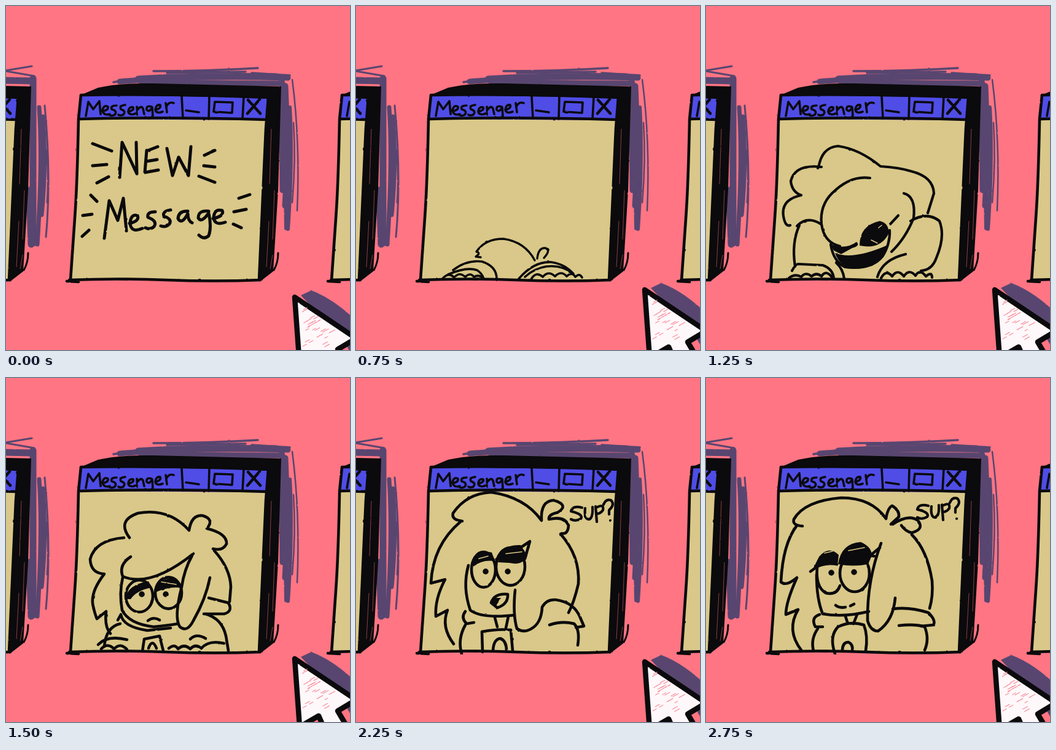
Recreate the animation shown at these times as an HTML page. Size 560 by 560 pixels, loop 3000 ms.

```html
<!DOCTYPE html>
<html lang="en">
<head>
<meta charset="utf-8">
<title>New message</title>
<style>
html, body { margin: 0; width: 100%; height: 100%; overflow: hidden; background: #ff7583; }
svg { display: block; width: 100vw; height: 100vh; }
.ink { fill: none; stroke: #0b0a0c; stroke-width: var(--w, 4.6); stroke-linecap: round; stroke-linejoin: round; }
.black { fill: #0b0a0c; stroke: none; }
.shade { fill: none; stroke: #584670; stroke-linecap: round; }
.dot { stroke-width: 9.5; }
.tan { stroke: #d9c889; stroke-width: 1.6; }
</style>
</head>
<body>
<svg viewBox="0 0 560 560" preserveAspectRatio="xMidYMid slice">
  <defs>
    <filter id="rough" filterUnits="userSpaceOnUse" x="-20" y="-20" width="620" height="660" color-interpolation-filters="sRGB">
      <feTurbulence type="fractalNoise" baseFrequency=".1" numOctaves="2" seed="4" result="noise"/>
      <feDisplacementMap in="SourceGraphic" in2="noise" scale="1.8" xChannelSelector="R" yChannelSelector="G"/>
      <feGaussianBlur stdDeviation=".45"/>
    </filter>
    <clipPath id="pane"><path d="M112 181H424L418 450H104Z"/></clipPath>
    <g id="window">
      <path class="black" d="M119 146L150 133Q185 125 240 126L448 131L443 300L435 432L413 449L420 150Z"/>
      <g fill="none" stroke="#f06b78" stroke-width="1" opacity=".55">
        <path d="M432 200L429 290M437 300L434 380M428 350L424 425M434 405L430 428"/>
      </g>
      <path fill="#d9c889" d="M120 184L424 186L412 446H106Q116 330 116 250Z"/>
      <path fill="#4f4de6" d="M122 145L427 149L424 186L119 184Z"/>
      <g class="ink">
        <path d="M122 145Q270 142 427 149L423 200L412 446M122 145L118 184Q116 290 112 345L105 446M99 448L118 449M104 446Q180 443 260 446T414 446M119 184Q260 180 424 185"/>
        <path stroke-width="3" d="M443 402Q443 418 436 430"/>
        <path stroke-width="3.6" d="M286 147L288 183M331 146L330 184M387 148L385 184M293 170L314 173M340 156L369 157L368 174L338 172Z"/>
        <path d="M394 153L414 175M413 152L393 175"/>
        <g stroke-width="3.6" transform="translate(1 1)" aria-label="Messenger">
          <path d="M129 178L133 155L141 167L151 154L153 175M156 170Q166 169 165 163Q159 159 156 168Q157 178 168 175M179 161Q169 161 171 167Q181 170 176 176Q171 179 167 176"/>
          <path d="M193 160Q183 161 186 167Q195 170 190 176Q185 178 182 176M198 171Q208 169 206 164Q199 162 198 171Q200 178 210 174M212 163L213 176M213 168Q219 160 222 166L224 175"/>
          <path d="M236 163Q227 160 228 168Q232 173 237 164L238 178Q234 184 226 180M242 168Q252 166 250 160Q243 159 242 168Q244 175 254 171M259 157L261 172M260 163Q264 154 272 157"/>
        </g>
      </g>
    </g>
  </defs>
  <rect width="560" height="560" fill="#ff7583"/>
  <g filter="url(#rough)">
    <g class="shade">
      <path stroke-width="9" d="M185 123Q300 113 459 117M215 118Q310 112 440 114M220 125L450 126"/>
      <path stroke-width="3.5" d="M240 106Q330 106 410 101M262 109L390 107M175 124L230 115M400 109L462 113"/>
      <path stroke-width="9" d="M449 120L450 300M455 130Q460 230 454 325"/>
      <path stroke-width="6" d="M462 165Q467 250 459 363M455 300L456 362"/>
      <path stroke-width="2.5" d="M466 120Q479 220 474 333M468 190Q472 250 466 320"/>
      <path stroke-width="11" d="M-5 121L43 122M44 118V386M38 300L41 388"/>
      <path stroke-width="7" d="M54 165Q60 250 51 388M60 180Q66 260 58 340"/>
      <path stroke-width="3" d="M0 105L42 98M0 106L46 114M63 162Q74 280 65 376M66 235Q70 280 67 320"/>
    </g>
    <use href="#window" x="-407"/>
    <use href="#window" x="425"/>
    <use href="#window"/>
  </g>
  <g id="cursor">
    <g filter="url(#rough)">
      <path fill="#584670" d="M480 471L497 463Q535 477 575 517V590L550 545Z"/>
      <path class="ink" style="fill:#fff8fa;--w:8.5" d="M470 474L478 585L509 567L527 608L563 598L540 559L570 541Z"/>
      <g id="scratches" stroke="#f78f9d" stroke-width="1.2" stroke-linecap="round"></g>
    </g>
  </g>
  <g clip-path="url(#pane)"><g id="actor" filter="url(#rough)"></g></g>
</svg>
<script>
const $ = id => document.getElementById(id);

// Each drawing: ink lines, solid black areas, dots and light strokes over the black.
const art = {
  notice: {
    width: 5,
    ink: [
      "M185 279L189 222L213 273L212 222M229 235L226 271L248 267M229 236L247 229M228 253L246 250M262 232L271 276L281 246L297 276L301 229",
      "M160 378L168 317L182 349L191 313L196 366M201 354Q218 350 214 341Q203 338 202 354Q204 370 222 362M243 335Q229 335 231 344Q247 350 241 359Q235 365 227 361",
      "M268 332Q254 334 257 342Q271 347 266 355Q260 361 252 358M296 334Q281 333 280 346Q286 357 296 338Q296 350 303 353",
      "M330 334Q313 332 313 345Q318 354 330 337Q335 360 330 374Q322 381 314 373M337 346Q356 342 352 333Q339 329 338 345Q340 358 357 352",
      "M141 224L172 236M141 260L164 258M148 288L167 278M323 243L340 235M322 260L340 262M314 277L340 287",
      "M138 308L148 318M125 341L140 339M124 375L135 365M379 313L397 307M371 335L391 331M370 355L383 361"
    ]
  },
  peek: {
    width: 3.4,
    ink: ["M203 409L195 408Q204 402 196 400Q210 379 240 379Q275 384 291 414M295 411Q297 393 308 394Q318 397 306 410"]
  },
  grip: {
    width: 3.6,
    ink: [
      "M158 430Q180 413 205 416Q230 424 229 446M150 437Q180 424 197 430Q205 435 208 444M140 445Q150 432 160 442Q168 432 178 441Q186 433 192 441Q200 436 208 444",
      "M265 444Q290 415 318 417Q340 420 354 436M275 441Q290 427 310 424Q335 421 352 435M285 445Q293 431 304 441Q313 430 324 440Q334 430 343 440Q352 432 357 441Q364 434 368 442"
    ]
  },
  bow: {
    width: 4.2,
    ink: [
      "M188 262Q145 257 138 285Q140 303 155 308Q122 315 126 342Q129 360 137 357M183 264Q188 230 215 228Q250 233 284 261Q315 263 334 269Q370 278 371 305L361 337",
      "M267 280Q235 275 205 305Q185 325 188 355Q192 385 218 391M322 305Q342 310 338 345Q325 378 302 400M203 388Q207 415 226 425Q265 430 287 408Q300 388 299 365M300 355L313 341"
    ],
    black: [
      "M203 388Q228 397 245 384Q252 390 238 394L220 404L208 398Z",
      "M210 402Q240 414 296 389Q290 428 240 428Q218 425 210 402Z",
      "M250 390Q250 357 283 350Q299 354 297 371Q284 397 250 390Z"
    ],
    light: ["M281 361L286 357M269 381L279 386"]
  },
  arms: {
    width: 4.2,
    ink: [
      "M148 358Q165 341 187 355M152 357Q139 385 145 424M140 431Q146 420 150 420L190 422Q207 428 208 444M212 418Q223 428 225 444M135 443Q145 435 155 441Q162 432 172 440Q180 433 188 440Q196 428 206 443",
      "M333 350Q360 334 380 350Q390 375 375 410Q368 430 350 431M279 441Q287 413 325 404M285 443Q293 428 303 440Q312 427 322 440Q331 427 341 439Q348 427 358 440Q368 432 368 442"
    ]
  },
  glum: {
    ink: [
      "M201 260Q180 232 215 220Q265 211 298 248Q302 222 320 224Q340 230 327 245Q360 253 359 270Q353 282 337 278M192 260Q145 264 137 295Q138 318 160 319Q136 350 142 372Q145 385 148 392L163 380Q160 405 170 416",
      "M203 291Q183 304 190 323Q235 342 305 286M303 289Q290 312 286 340Q273 390 283 405Q295 415 305 395Q325 360 332 325M339 281Q365 310 366 340L364 364M330 358L362 366Q370 380 355 384L322 384",
      "M190 325Q184 350 189 378Q200 400 240 405Q262 403 280 400M182 394L187 385Q190 405 230 411L268 407M160 437Q163 405 186 400M325 384Q352 392 358 420L362 444M231 395Q240 388 250 394",
      "M239 355A22 26 0 1 1 195 355A22 26 0 1 1 239 355M286 350A21 25 0 1 1 243 350A21 25 0 1 1 286 350",
      "M150 434Q165 418 197 426M155 441Q165 430 176 441Q186 430 197 442M222 445L225 425L250 420L256 444M232 440Q238 423 245 440M265 440Q275 432 280 441Q290 432 300 441Q308 432 318 440Q330 426 355 432M300 425Q310 415 325 424"
    ],
    black: ["M194 360Q198 336 232 331L237 341Q212 346 203 360Z", "M243 343Q252 322 278 328L287 342Q268 338 243 349Z"],
    dots: "M221 352h.1M260 352h.1",
    light: ["M253 332L277 336"]
  },
  grin: {
    ink: [
      "M185 241Q160 235 167 210Q180 186 215 185Q280 183 309 228M311 222Q316 200 327 197Q342 200 338 212Q335 222 328 224Q345 227 346 245Q340 257 328 251M180 240Q140 252 129 325Q140 332 150 326Q135 365 140 385L158 380Q150 405 172 425",
      "M340 256Q354 290 352 357M191 293Q186 350 196 380Q225 387 270 384M286 312Q271 345 273 378Q284 403 300 401Q322 387 323 298M190 322L202 320M279 287L295 275L283 301",
      "M321 358Q350 356 366 383Q366 398 340 392M342 400Q364 408 361 444M197 370Q180 380 185 394Q193 399 199 395M190 399Q173 418 184 444M213 407L258 405V437L215 440ZM232 390L236 405M256 388L249 404M218 442L222 425L241 424L243 440",
      "M216 360Q240 353 257 349Q255 368 235 370Q215 372 216 360ZM226 358L227 369M236 355L237 369M246 353L247 364"
    ],
    black: [
      "M237 307A21 28 0 1 1 195 307A21 28 0 1 1 237 307Z",
      "M288 306A25 28 0 1 1 239 306A25 28 0 1 1 288 306Z"
    ],
    light: ["M203 308L212 303M219 318L226 311M251 304L275 299M253 316L275 314"]
  },
  talk: {
    ink: [
      "M173 233Q155 231 158 220Q180 188 220 186Q275 194 302 232Q300 200 322 199Q348 207 328 219Q313 222 314 230Q340 224 346 240Q345 255 335 253M170 234Q125 272 122 334L145 328Q128 360 130 388L149 378Q138 405 159 433",
      "M333 254Q365 290 362 335Q355 365 346 382M183 305Q173 340 186 378Q205 392 258 386M259 345Q255 385 262 408Q275 417 290 405Q302 395 303 373Q310 360 325 361Q355 365 365 390L371 404L358 406M315 402Q335 395 355 400Q365 410 361 435",
      "M227 312A19 28 0 1 1 188 312A19 28 0 1 1 227 312M275 307A23 30 0 1 1 228 307A23 30 0 1 1 275 307M268 276L283 266L275 294M220 366Q225 350 247 352Q248 368 230 374Z",
      "M178 380Q170 390 180 400L192 398M178 402Q165 425 172 449M206 446L205 413Q230 408 252 410L255 444M223 444Q224 425 235 424Q245 428 245 444M226 390L230 405M248 388L244 407"
    ],
    black: ["M191 302Q196 279 221 284L226 298Q205 295 191 307Z", "M231 300Q235 270 268 272L279 289Q272 306 250 301Z", "M219 365L225 358L236 358L228 371Z"],
    dots: "M211 315h.1M247 315h.1",
    light: ["M244 286L270 283M200 294L215 290"]
  },
  calm: {
    ink: [
      "M157 241Q140 240 143 230Q160 200 220 195Q270 195 293 229Q296 211 303 208Q315 215 314 226L301 238M304 238Q330 221 345 232Q356 246 335 252Q325 250 318 240M148 240Q125 270 122 332Q130 340 148 325Q130 365 130 385L150 377Q130 410 155 443",
      "M335 255Q360 280 368 330Q370 355 364 375M180 320Q180 360 190 384Q225 390 265 380M285 269Q262 330 263 395Q268 412 280 412Q305 395 308 358M304 376Q330 372 362 382Q375 395 370 402L350 404M314 403Q340 400 356 405Q364 425 356 443",
      "M181 308Q178 340 195 350Q213 354 218 338M266 318A24 30 0 1 1 218 318A24 30 0 1 1 266 318M211 370Q217 375 227 373M235 371L241 368M170 315L181 307M265 291L283 276M266 289L274 290",
      "M185 385Q170 390 178 405L190 405M182 408Q170 425 175 444M210 449Q200 420 215 405Q235 395 257 402Q264 420 260 444M222 444Q222 430 232 430Q240 434 238 444M227 388L231 400M246 385L240 400"
    ],
    black: ["M173 313L184 291Q200 272 216 288L214 306Q196 301 173 313Z", "M215 303Q220 269 252 267Q270 275 270 289L264 303Q240 308 215 303Z"],
    dots: "M204 317h.1M241 316h.1",
    light: ["M193 285L206 282M232 281L258 276"]
  },
  sup: {
    width: 4.2,
    ink: ["M368 211Q352 207 350 217Q371 222 366 229Q358 234 350 230M373 212Q371 231 380 230Q386 227 385 210M390 209L392 234M391 211Q404 204 402 215Q398 221 392 221M403 206Q407 196 415 199Q422 206 412 215L412 222M414 232h.1"]
  }
};

// [start, cursor lift, drawings as [name, dx, dy]]
const steps = [
  [0, 0, ["notice"]],
  [120, 0],
  [250, 0, ["notice"]],
  [370, 0],
  [500, 0, ["notice"]],
  [620, 0, ["grip", 0, 14]],
  [750, 12, ["peek"], ["grip"]],
  [870, 12, ["bow", 0, 108], ["grip"]],
  [1000, 12, ["bow", 0, 65], ["arms", 0, 22]],
  [1120, 12, ["bow", 0, 22], ["arms", 0, 7]],
  [1250, 12, ["bow"], ["arms"]],
  [1370, 17, ["glum", 0, 14]],
  [1500, 17, ["glum"]],
  [1620, 17, ["glum", -2, -5]],
  [1750, 17, ["grin", 1, 8]],
  [1870, 17, ["grin"]],
  [2120, 12, ["talk", 2, 5]],
  [2250, 12, ["talk"], ["sup"]],
  [2370, 12, ["talk", 0, 2], ["sup", -2, -1]],
  [2500, 12, ["calm", 0, -2], ["sup", -4, -2]],
  [2750, 12, ["calm"], ["sup", -6, -3]]
];

const path = (d, cls) => `<path class="${cls}" d="${d}"/>`;

function draw([name, dx = 0, dy = 0]) {
  const { ink, black = [], dots = "", light = [], width = 4.6 } = art[name];
  return `<g transform="translate(${dx} ${dy})" style="--w:${width}">` +
    ink.map(d => path(d, "ink")).join("") +
    black.map(d => path(d, "black")).join("") +
    (dots && path(dots, "ink dot")) +
    light.map(d => path(d, "ink tan")).join("") + "</g>";
}

function scratches() {
  let seed = 7, out = "";
  const rnd = () => (seed = seed * 16807 % 2147483647) / 2147483647;
  for (let i = 0; i < 24; i++) {
    const y = 494 + rnd() * 66, x = 480 + rnd() * Math.min(56, (y - 490) * 1.2);
    const len = 4 + rnd() * 6;
    out += `<path d="M${x} ${y}l${len} ${-len * .55}"/>`;
  }
  $("scratches").innerHTML = out;
}

let shown;
function render(ms) {
  const t = ms % 3000;
  const step = steps.findLast(s => s[0] <= t);
  if (step === shown) return;
  shown = step;
  const [, lift, ...parts] = step;
  $("cursor").setAttribute("transform", `translate(0 ${-lift})`);
  $("actor").innerHTML = parts.map(draw).join("");
}

scratches();
const start = performance.now();
function loop() {
  render(performance.now() - start);
  requestAnimationFrame(loop);
}
loop();
</script>
</body>
</html>
```
